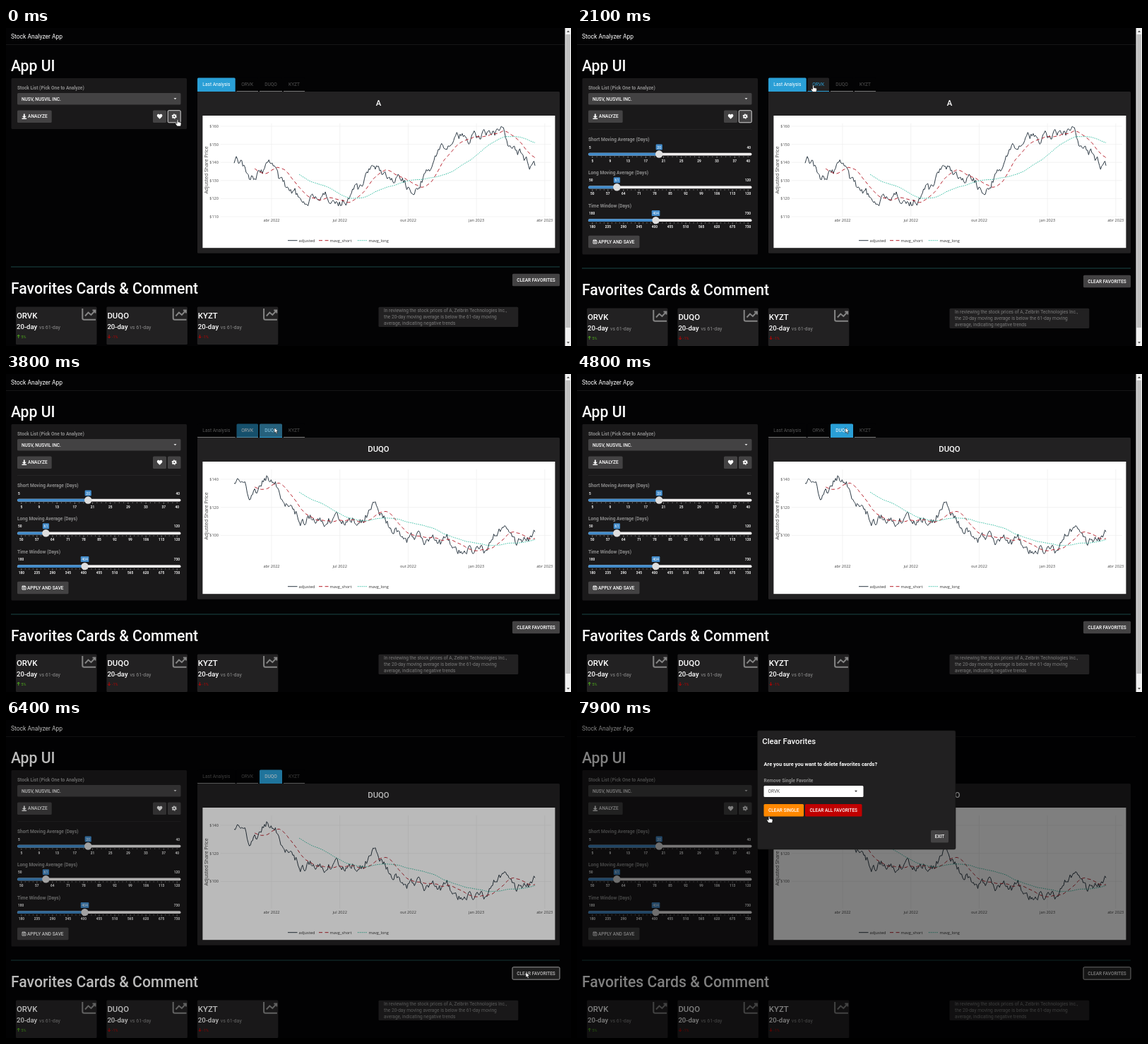
An HTML page that plays this animation: 800 px wide and 450 px high, repeating every 8 s.

```html
<!DOCTYPE html>
<html lang="en">
<head>
<meta charset="utf-8">
<title>Stock Analyzer App</title>
<style>
html, body { margin: 0; width: 100%; height: 100%; overflow: hidden; background: #030304; }
svg { display: block; width: 800px; height: 450px; font-family: Roboto, sans-serif; }
.plot { font-family: "Open Sans", sans-serif; }
</style>
</head>
<body>
<svg id="stage" viewBox="0 0 800 450"></svg>
<script>
const LOOP = 8000;
const TICKERS = ['ORVK', 'DUQO', 'KYZT'];
const BLUE = [42, 159, 214], WHITE = [255, 255, 255], GREY = [85, 85, 85], RULE = [119, 119, 119];
const PANEL = '#222122', BUTTON = '#434243', LABEL = '#8c8c8c';

// Markup helpers
const mid = 'text-anchor="middle"', end = 'text-anchor="end"';
const txt = (s, x, y, size, fill = '#fff', weight = 400, more = '') =>
  `<text x="${x}" y="${y}" font-size="${size}" fill="${fill}" font-weight="${weight}" ${more}>${s}</text>`;
const box = (x, y, x2, y2, fill, r = 0, more = '') =>
  `<rect x="${x}" y="${y}" width="${x2 - x}" height="${y2 - y}" fill="${fill}" rx="${r}" ${more}/>`;
const line = (d, color, width = 1, more = '') =>
  `<path d="${d}" fill="none" stroke="${color}" stroke-width="${width}" ${more}/>`;
const dot = (x, y, r, fill, more = '') => `<circle cx="${x}" cy="${y}" r="${r}" fill="${fill}" ${more}/>`;
const caret = (x, y, fill) => `<path d="M${x - 2} ${y - 1}h4l-2 2.2z" fill="${fill}"/>`;
const label = (s, x, y) => txt(s, x, y, 6.6, LABEL, 700);
// The caption is centred unless room is left for an icon
const button = (s, x, y, x2, fill = BUTTON, icon = 0, more = '') =>
  box(x, y, x2, y + 17.5, fill, 1.5, more) + txt(s, (x + x2 + icon) / 2, y + 10.9, 6.5, '#fff', 500, mid);

// Charts: a few trend heights, joined smoothly, with seeded day-to-day noise
const charts = [
  { title: 'A', seed: 11, top: 160, step: 10, y: 139, gap: 25.6, rows: 6,
    trend: [189, 208, 200, 228, 245, 235, 245, 230, 196, 215, 226, 201, 165, 155, 153, 148, 178, 203] },
  { title: TICKERS[0], seed: 23, top: 170, step: 10, y: 160, gap: 22.6, rows: 5,
    trend: [156, 176, 156, 178, 210, 223, 239, 212, 178, 156, 194, 226, 212, 226, 214, 248, 232, 198] },
  { title: TICKERS[1], seed: 41, top: 140, step: 20, y: 149, gap: 39.7, rows: 3,
    trend: [154, 172, 146, 183, 204, 205, 203, 207, 190, 214, 233, 236, 238, 250, 253, 222, 243, 228] }
];
const DAYS = 278, LEFT = 323, DAY = 426 / (DAYS - 1);

const swing = p => .5 - Math.cos(p * Math.PI) / 2;

function random(seed) {
  return () => (seed = (seed * 16807) % 2147483647) / 2147483647;
}

function priceSeries({ trend, seed }) {
  const rnd = random(seed * 7919);
  let noise = 0;
  return Array.from({ length: DAYS }, (_, i) => {
    const u = i / (DAYS - 1) * (trend.length - 1), k = Math.min(Math.floor(u), trend.length - 2);
    noise = noise * .75 + (rnd() - .5) * 12;
    return trend[k] + (trend[k + 1] - trend[k]) * swing(u - k) + noise;
  });
}

const average = (data, n) =>
  data.map((_, i) => i < n - 1 ? null : data.slice(i - n + 1, i + 1).reduce((a, b) => a + b) / n);
const curve = data =>
  'M' + data.map((y, i) => y === null ? '' : `${(LEFT + i * DAY).toFixed(1)} ${y.toFixed(1)}`).filter(Boolean).join('L');

const styles = [
  ['adjusted', '#2c3944', 'stroke-linejoin="round"', 399],
  ['mavg_short', '#b8202c', 'stroke-dasharray="5 3.6"', 443],
  ['mavg_long', '#18b596', 'stroke-dasharray="1.3 1.5"', 498]
];

function chart(c, i) {
  const price = priceSeries(c), data = [price, average(price, 20), average(price, 61)];
  let grid = '';
  for (let r = 0; r < c.rows; r++) {
    const y = c.y + r * c.gap;
    grid += line(`M304 ${y}H772`, '#eee', .7) + txt('$' + (c.top - r * c.step), 301, y + 2, 5.6, '#444', 400, end);
  }
  return `<g id="chart${i}">${txt(c.title, 527.5, 110, 11.3, '#fff', 500, mid)}<g class="plot">${grid}` +
    data.map((d, k) => line(curve(d), styles[k][1], 1, styles[k][2])).join('') + '</g></g>';
}

function plotBase() {
  const months = ['abr 2022', 'jul 2022', 'out 2022', 'jan 2023', 'abr 2023'];
  return box(271, 90, 784, 318.7, PANEL, 1.5) + box(278.4, 124, 777.4, 311.2, '#fff') + '<g class="plot">' +
    months.map((s, i) => {
      const x = 376 + i * 96.7;
      return line(`M${x} 135V267`, '#eee', .7) + txt(s, x, 273.5, 5.6, '#444', 400, mid);
    }).join('') +
    txt('Adjusted Share Price', 0, 0, 7, '#444', 400, mid + ' transform="translate(286 201) rotate(-90)"') +
    styles.map(([s, color, dash, x]) =>
      line(`M${x} 300.7h13.5`, color, 1, dash) + txt(s, x + 15.5, 302.7, 5.7, '#333')).join('') + '</g>';
}

function slider(y, title, min, max, value, step) {
  const at = v => 21.8 + (v - min) / (max - min) * 220.4;
  const x = at(value), half = value > 99 ? 5.8 : 4.6;
  const number = (v, nx, ny, anchor) => txt(v, nx, ny, 4.8, '#eee', 700, anchor);
  let ticks = '', numbers = number(max, at(max), y + 32, mid);
  for (let v = min; v <= max; v += step / 4) {
    const major = (v - min) % step === 0;
    ticks += `M${at(v)} ${y + 24}v${major ? 2.6 : 1.4}`;
    if (major && v < max) numbers += number(v, at(v), y + 32, mid);
  }
  return label(title, 16, y + 2.7) + number(min, 17, y + 13, '') + number(max, 246, y + 13, end) +
    box(16, y + 19.2, 247.5, y + 23, '#f0eeee', 1.9) + box(16, y + 19.2, x, y + 23, '#428bca', 1.9) +
    line(ticks, '#bbb', .6) + numbers +
    box(x - half, y + 7, x + half, y + 15, '#428bca', 1.2) + txt(value, x, y + 13, 5.2, '#fff', 400, mid) +
    dot(x, y + 21, 5.2, '#dedede');
}

function card(name, i) {
  const up = i === 0, color = up ? '#4fae1c' : '#c00000', x = 14 + i * 128.4, d = up ? -1 : 1;
  return box(x, 394.5, x + 114.5, 448, PANEL, 1.5) + txt(name, x + 1, 410.5, 11.4, '#fff', 500) +
    line(`M${x + 94.3} 397v13.500q0 2.300 2.300 2.300h16.500`, '#858585', 2) +
    line(`M${x + 98} 407.500l4.500-5 4 3.500 5.500-6M${x + 108.500} 399.500h4v4`, '#858585', 1.9) +
    txt('20-day', x + 1, 425.5, 9.6, '#fff', 500) + txt('vs 61-day', x + 33, 425.5, 7.1, LABEL) +
    line(`M${x + 3.7} 434.200v4.600M${x + 1.700} ${436.500 + d * .3}l2 ${d * 2} 2 ${-d * 2}`, color) +
    txt(up ? '5%' : '-1%', x + 7.5, 439, 5.4, color);
}

const tabs = [['Last Analysis', 271, 324.7], [TICKERS[0], 326.5, 357], [TICKERS[1], 359, 391], [TICKERS[2], 393, 423]];
const comment = ['In reviewing the stock prices of A, Zelbrin Technologies Inc.,',
  'the 20-day moving average is below the 61-day moving', 'average, indicating negative trends'];

const controls =
  box(7.5, 71, 256, 143, '#1a191a', 1.5, 'id="panel"') + label('Stock List (Pick One to Analyze)', 16, 87) +
  box(16, 92, 247.5, 108.5, BUTTON, 1.5) + txt('NUSV, NUSVIL INC.', 22, 102.6, 6.5, '#fff', 500) + caret(239.5, 100, '#ddd') +
  button('ANALYZE', 16, 116.5, 64.7, BUTTON, 9) +
  line('M25.800 121.500v4', '#fff', 1.8) + '<path d="M22.700 124.800h6.200l-3.100 3z" fill="#fff"/>' + line('M22.500 128.300h6.600', '#fff', 1.4) +
  button('', 208, 116.5, 227) +
  '<path d="M217.600 128.700l-3.200-3.300c-1.900-2.300 1.300-4.900 3.200-2.700 1.900-2.200 5.100.4 3.200 2.700z" fill="#fff"/>' +
  button('', 229, 116.5, 247.5) + dot(238.2, 125, 1.9, 'none', 'stroke="#fff" stroke-width="1.7"') +
  dot(238.2, 125, 3, 'none', 'stroke="#fff" stroke-width="1.2" stroke-dasharray="1.7 1.44"') +
  box(229.2, 116.7, 247.2, 133.8, 'none', 1.5, 'id="gearRing" stroke="#fff" stroke-width=".8"') +
  '<clipPath id="reveal"><rect id="revealBox" x="7" y="143" width="250" height="0"/></clipPath><g clip-path="url(#reveal)">' +
  line('M16 143.500H247.500', '#2a292a', .7) +
  slider(157.5, 'Short Moving Average (Days)', 5, 40, 20, 4) +
  slider(204.3, 'Long Moving Average (Days)', 50, 120, 61, 7) +
  slider(251.1, 'Time Window (Days)', 180, 730, 404, 55) +
  button('APPLY AND SAVE', 16, 293.7, 88.5, BUTTON, 7) +
  line('M23 300h4l1 1v4h-5zM24 300v1.800h2.500v-1.800', '#fff', .9) + dot(25.5, 303.6, .8, '#fff') + '</g>';

const page =
  txt('Stock Analyzer App', 7, 14.8, 8.5) + line('M0 23.500H791', '#1b1b1c', .8) +
  txt('App UI', 7, 61, 21.2, '#fff', 500) + controls +
  tabs.map(([s, x, x2], i) => `<g id="tab${i}">` + box(x, 70.5, x2, 90, '#2a9fd6', 1.5) +
    line(`M${x} 89.500H${x2}`, '#777') + txt(s, (x + x2) / 2, 82.2, 6.6, '#fff', 400, mid) + '</g>').join('') +
  plotBase() + charts.map(chart).join('') +
  '<g id="lower">' + line('M7 338H784', '#1f504e', .9) +
  txt('Favorites Cards &amp; Comment', 7, 375.5, 21.2, '#fff', 500) +
  button('CLEAR FAVORITES', 717, 347.7, 784, BUTTON, 0, 'id="clearBtn" stroke-width=".8"') +
  TICKERS.map(card).join('') + box(527.5, 394.7, 725.3, 423, PANEL, 1.5) +
  comment.map((s, i) => txt(s, 535, 401.6 + i * 9.4, 6.6, '#7b7b7b')).join('') + '</g>' +
  '<g id="scrollbar">' + box(791.5, 0, 800, 450, '#f1f1f1') + box(792.5, 9, 799, 424, '#c1c1c1') +
  '<path d="M794 6h4l-2-2.500zM794 444h4l-2 2.500z" fill="#555"/></g>';

const modal = '<g id="modal">' +
  box(255.5, 15, 536, 183, '#212021', 2, 'stroke="#111" stroke-width=".6"') +
  txt('Clear Favorites', 262.3, 33.5, 11.3, '#fff', 500) +
  txt('Are you sure you want to delete favorites cards?', 264.6, 65.4, 7.45, '#fff', 700) +
  label('Remove Single Favorite', 264.6, 88) +
  box(264.5, 93, 405.5, 109, '#fff', 1.5) + txt(TICKERS[0], 270.5, 103.2, 6.5, '#555') + caret(395, 100.7, '#333') +
  button('CLEAR SINGLE', 264.5, 119, 321, '#ff8800') +
  button('CLEAR ALL FAVORITES', 323, 119, 403.5, '#c00000') + button('EXIT', 501, 156, 526) + '</g>';

const pointers =
  '<path id="arrow" d="M0 0v7.300l1.700-1.500 1.200 2.800 1.300-.6-1.200-2.700h2.300z" fill="#fff" stroke="#000" stroke-width=".5"/>' +
  '<path id="hand" d="M-.9.800Q0-.6.9.800V3.500l3 .6q1.300.3 1.200 1.600L4.500 9.500H-.7L-3 6.200q-.5-1.300.6-1.400l1.500.9z" fill="#fff" stroke="#000" stroke-width=".6"/>';

document.getElementById('stage').innerHTML = page +
  '<rect id="shade" width="800" height="450" opacity="0"/>' + modal + pointers;

// Motion
const $ = id => document.getElementById(id);
const ramp = (t, from, length) => Math.min(1, Math.max(0, (t - from) / length));
const mix = (a, b, p) => `rgb(${a.map((v, i) => Math.round(v + (b[i] - v) * p))})`;
const show = (id, on) => $(id).style.display = on ? '' : 'none';
const between = (t, a, b) => t >= a && t < b;

const OPEN = 850, FIRST = 2350, SECOND = 3720, PRESS = 6200, SHADE = 6320, MODAL = 6500;

// Pointer moves, and when the pointer stops being a hand at each place
const start = { x: 243, y: 129.5, to: 0, until: 1400 };
const moves = [
  { from: 1350, to: 1900, x: 334.5, y: 81, until: FIRST },
  { from: 3200, to: 3650, x: 380, y: 76, until: SECOND },
  { from: 4900, to: 5650, x: 736, y: 357, until: SHADE },
  { from: 6950, to: 7700, x: 272, y: 136, until: LOOP }
];

function pointerAt(t) {
  let { x, y } = start;
  for (const m of moves) {
    const p = swing(ramp(t, m.from, m.to - m.from));
    x += (m.x - x) * p;
    y += (m.y - y) * p;
  }
  return { x, y, hand: [start, ...moves].some(m => between(t, m.to - 60, m.until)) };
}

function drawTabs(t) {
  const first = ramp(t, FIRST, 160), second = ramp(t, SECOND, 160);
  const active = [1 - first, first - second, second, 0];
  active.forEach((p, i) => {
    const hover = i === 1 && between(t, 1840, FIRST) || i === 2 && between(t, 3590, SECOND + 160);
    const [fill, rule, name] = $('tab' + i).children;
    fill.setAttribute('fill', mix(hover ? [34, 33, 34] : [3, 3, 4], BLUE, p));
    rule.setAttribute('stroke', mix(hover ? BLUE : RULE, BLUE, p));
    name.setAttribute('fill', mix(hover ? BLUE : GREY, WHITE, p));
  });
  const current = t < FIRST ? 0 : t < SECOND ? 1 : 2;
  charts.forEach((_, i) => show('chart' + i, i === current));
}

function draw(t) {
  const bottom = 143 + 177.5 * swing(ramp(t, OPEN, 500));
  $('panel').setAttribute('height', bottom - 71);
  $('revealBox').setAttribute('height', bottom - 143);
  $('lower').setAttribute('transform', `translate(0 ${Math.max(0, bottom - 318.5)})`);
  show('gearRing', t < FIRST);
  drawTabs(t);

  const pressed = t >= PRESS;
  $('clearBtn').setAttribute('fill', pressed ? '#2b2a2b' : t >= 5590 ? '#373637' : BUTTON);
  $('clearBtn').setAttribute('stroke', pressed ? '#fff' : 'none');

  show('scrollbar', t < SHADE);
  $('shade').setAttribute('opacity', .5 * ramp(t, SHADE, 150));
  $('modal').setAttribute('opacity', ramp(t, MODAL, 150));
  $('modal').setAttribute('transform', `translate(0 ${-50 * (1 - ramp(t, MODAL, 300)) ** 1.9})`);

  const { x, y, hand } = pointerAt(t);
  show('hand', hand);
  show('arrow', !hand);
  $(hand ? 'hand' : 'arrow').setAttribute('transform', `translate(${x} ${y})`);
}

function tick() {
  draw(performance.now() % LOOP);
  requestAnimationFrame(tick);
}
tick();
</script>
</body>
</html>
```
